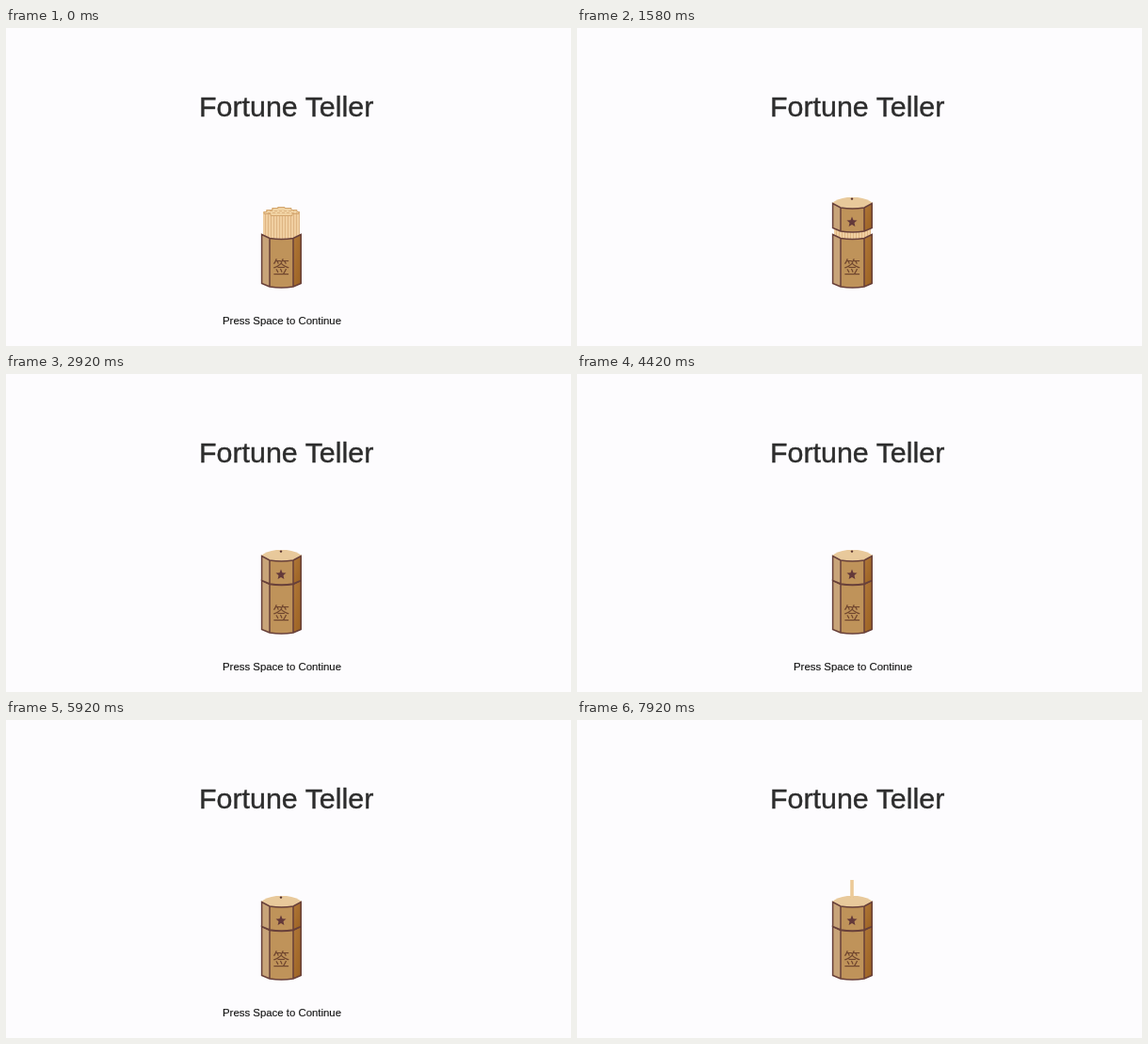
Write an HTML page that moves like this. It is 600x338 px and loops after 8000 ms.

```html
<!DOCTYPE html>
<html lang="en">
<head>
<meta charset="utf-8">
<title>Fortune Teller</title>
<style>
  html, body { margin: 0; width: 100%; height: 100%; overflow: hidden; background: #fdfcfe; }
  svg { display: block; width: 100vw; height: 100vh; }
  text { font-family: "Liberation Sans", Arial, sans-serif; }
  .title { font-size: 30.4px; fill: #2d2d2d; stroke: #2d2d2d; stroke-width: .4; }
  .prompt { font-size: 11.4px; fill: #151515; stroke: #151515; stroke-width: .15; animation: prompt 8s step-end infinite; }
  .glyph { font: 18px "Noto Sans CJK SC", "Noto Sans CJK", sans-serif; fill: #70462f; text-anchor: middle; }
  .outline { fill: none; stroke: #68403a; stroke-width: 1.5; }
  .left { fill: #c8a479; }
  .front { fill: #bf935a; }
  .right { fill: url(#shade); }
  .cup { animation: shake 8s infinite; }
  .lid { animation: lid 8s linear infinite; }
  .stick { animation: rise 8s linear infinite; }

  /* The prompt hides while the cup is moving. */
  @keyframes prompt {
    0%, 23.6%, 35.4%, 51%, 66.6% { opacity: 1; }
    5%, 27.1%, 42.75%, 58.4%, 82.4%, 100% { opacity: 0; }
  }
  @keyframes lid {
    0%, 4.99% { opacity: 0; transform: translateY(-34px); }
    5% { opacity: 1; transform: translateY(-34px); }
    23.6%, 100% { opacity: 1; transform: none; }
  }
  @keyframes shake {
    0%, 27.1%, 35.4%, 42.75%, 51%, 58.4%, 66.6%, 100% {
      transform: translateY(0);
      animation-timing-function: ease-out;
    }
    31.25%, 46.875% { transform: translateY(-16px); animation-timing-function: ease-in; }
    62.5% { transform: translateY(-8px); animation-timing-function: ease-in; }
  }
  @keyframes rise {
    0%, 82.4% { transform: none; }
    100% { transform: translateY(-21.7px); }
  }
</style>
</head>
<body>
<svg viewBox="0 0 600 338">
  <defs>
    <linearGradient id="shade" x2="1" y2="1">
      <stop stop-color="#b0783a"/>
      <stop offset="1" stop-color="#995f20"/>
    </linearGradient>
    <pattern id="slats" x="273" width="3" height="10" patternUnits="userSpaceOnUse">
      <rect width="3" height="10" fill="#f0cfa1"/>
      <rect x="2" width="1" height="10" fill="#deb583"/>
    </pattern>
    <clipPath id="aboveHole"><rect x="280" y="140" width="24" height="50"/></clipPath>
  </defs>

  <text class="title" x="205" y="94">Fortune Teller</text>
  <text class="prompt" x="230" y="315">Press Space to Continue</text>

  <g class="cup">
    <path fill="url(#slats)" d="M273 195H276V193H282V191H288V190H296V191H303V193H309V195H312V225H273Z"/>
    <path fill="#f0d2a2" stroke="#d3a56e" d="M274 195.5H277V193.5H283V191.5H289V190.5H296V191.5H303V193.5H309V195.5H311V197.5H304V199.5H281V197.5H274Z"/>
    <path stroke="#deb583" stroke-dasharray="3 2" d="M280 194.5H306M278 196.5H309"/>

    <path class="left" d="M271 219L280 223.5V275L271 271.5Z"/>
    <path class="front" d="M280 223.5Q292.5 225.5 305 223.5V275Q292.5 277 280 275Z"/>
    <path class="right" d="M305 223.5L314 219V271.5L305 275Z"/>
    <path class="outline" d="M271.6 219.5L280 223.5Q292.5 225.5 305 223.5L313.2 219.5V271.5L305 275Q292.5 277 280 275L271.6 271.5ZM280 223V275M305 223V275"/>
    <text class="glyph" x="292.3" y="261" lang="zh">签</text>

    <g class="lid">
      <path class="left" d="M271 193L280 198V223L271 219.5Z"/>
      <path class="front" d="M280 198Q292.5 200 305 198V223Q292.5 225 280 223Z"/>
      <path class="right" d="M305 198L314 193V219.5L305 223Z"/>
      <path fill="#e8c99b" d="M271 193Q276 188.5 287 187H298Q309 188.5 314 193L305 198Q292.5 200 280 198Z"/>
      <path class="outline" d="M271.6 193.5V219.5L280 223Q292.5 225 305 223L313.2 219.5V193.5L305 198Q292.5 200 280 198ZM280 198V223M305 198V223"/>
      <circle cx="292" cy="188.6" r="1.2" fill="#55302c"/>
      <path fill="#63393a" d="M292 207.5L293.5 211.2L297.5 211.5L294.5 214.1L295.4 218L292 215.9L288.6 218L289.5 214.1L286.5 211.5L290.5 211.2Z"/>
    </g>
  </g>

  <g clip-path="url(#aboveHole)">
    <rect class="stick" x="290.2" y="190" width="3.6" height="30" fill="#ecca98"/>
  </g>
</svg>
</body>
</html>
```
